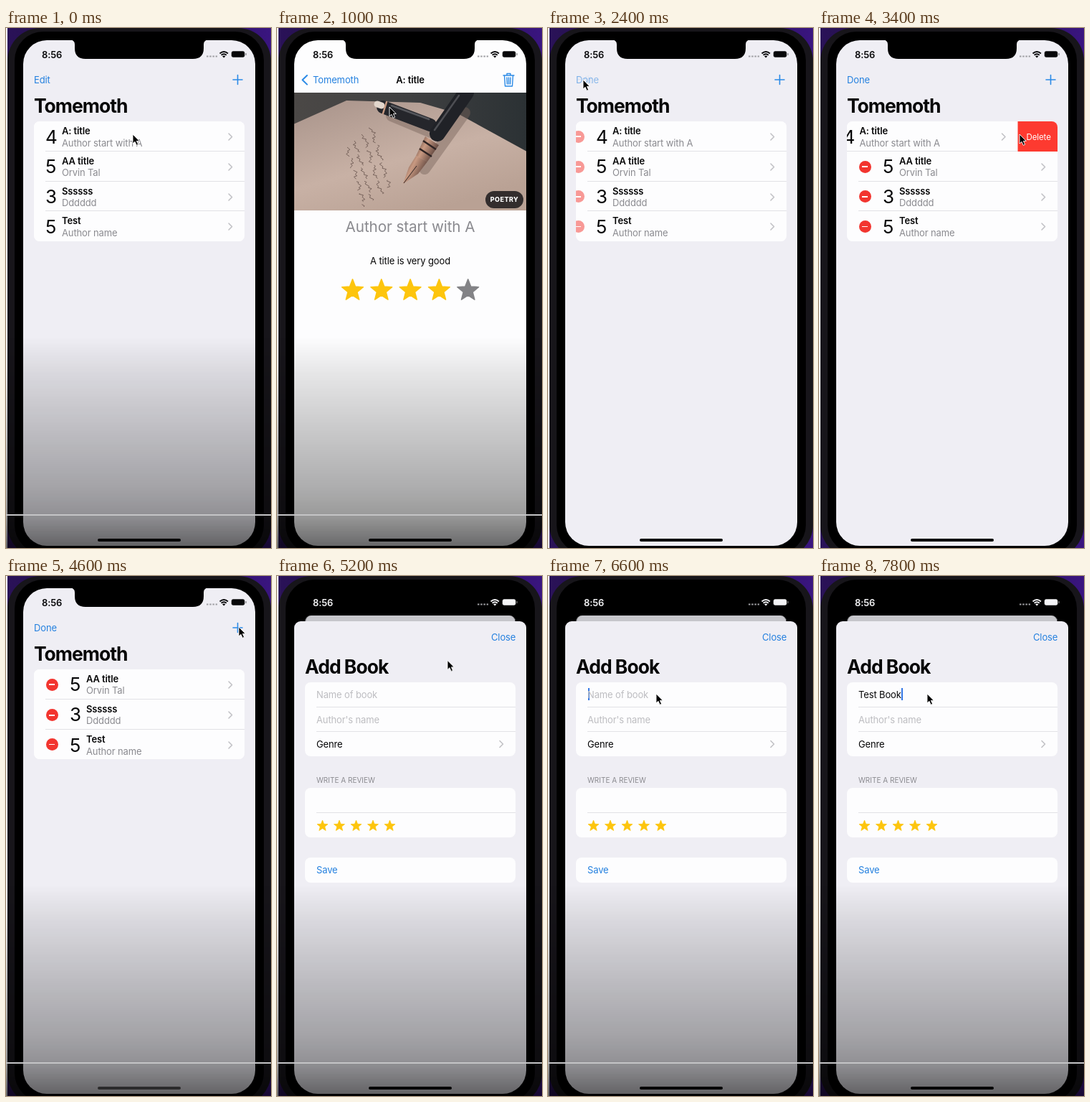
Animation of 370 by 724 pixels, one loop 8000 ms. Source, as an HTML page:

```html
<!DOCTYPE html>
<html lang="en">
<head>
<meta charset="utf-8">
<title>Reading list app</title>
<style>
* { box-sizing: border-box; animation: 8s linear var(--t, 0ms) infinite paused; }
html, body { margin: 0; width: 100%; height: 100%; overflow: hidden; background: #fff; }
body { font: 13px/20px Inter, Roboto, sans-serif; letter-spacing: -.13px; color: #060607; }
div, svg { position: absolute; }
svg { left: 0; top: 0; width: 370px; height: 724px; overflow: visible; fill: none; }
#stage { left: 0; top: 0; width: 370px; height: 724px; overflow: hidden; }
.wall { left: 1.5px; right: 0; top: 0; bottom: 0; background: linear-gradient(90deg, #2a1258, #1c0e3c 50%, #3a1580); }
.frame { left: 1.5px; right: 0; top: 0; height: 738px; border-radius: 46px; background: #17151a; }
.bezel { left: 12px; right: 10px; top: 5px; height: 727px; border-radius: 40px; background: #000; }
.screen { left: 24px; top: 17px; width: 324px; height: 704px; border-radius: 33px; overflow: hidden; background: #000; }

/* Views fill the screen; .in restores stage coordinates inside them. */
.view { --top: 0px; left: 0; top: var(--top); width: 324px; height: 704px; overflow: hidden; background: #efeef4; }
.in { left: -24px; top: calc(-17px - var(--top)); width: 370px; height: 724px; }
.t { left: calc(var(--x) * 1px); top: calc(var(--y) * 1px - 10px); white-space: nowrap; }
.mid { transform: translateX(-50%); }
.blue { color: #2480df; }
.grey { color: #8a8a8f; }
.hint { color: #bdbdc1; }
.semi { font-weight: 600; }
.big { font-size: 26.5px; font-weight: 700; letter-spacing: -1px; }
.line { stroke: #2b8ae6; stroke-width: 1.6; stroke-linecap: round; stroke-linejoin: round; }
.chev { stroke: #c2c2c6; stroke-width: 1.6; stroke-linecap: round; stroke-linejoin: round; }

.card { left: 39px; width: 294px; border-radius: 8px; overflow: hidden; background: #fdfdfe; }
.card hr { position: absolute; left: 16px; right: 0; height: 1px; margin: 0; border: 0; background: #e2e2e6; }
.row { position: relative; height: 41.75px; overflow: hidden; }
.face { left: 0; top: 0; width: 294px; height: 41.75px; background: #fdfdfe; }
.face hr { bottom: 0; }
.row:last-child hr { display: none; }
.body { left: 0; top: 0; animation-name: shift; }
.num { font-size: 26px; letter-spacing: 0; }
.minus { left: -17.5px; top: 12.8px; width: 17px; height: 17px; border-radius: 50%; background: #f2352f; animation-name: reveal; }
.minus::after { content: ""; position: absolute; left: 4.2px; top: 7.7px; width: 8.6px; height: 1.6px; background: #fff; }
.delete { left: 294px; top: 0; width: 294px; height: 41.75px; background: #fd3a30; color: #fff; font-size: 11.5px; letter-spacing: -.1px; }
.row:first-child { animation-name: collapse; }
.row:first-child .face { animation-name: swipe; }

#home { transform-origin: 162px 0; animation-name: behind; }
#list { animation-name: part; }
#detail { background: #fdfdfe; animation-name: push; }
#sheet { --top: 46px; border-radius: 9px 9px 0 0; animation-name: rise; }
#edit { animation-name: conceal; }
#done { animation-name: reveal; }
#status { animation-name: invert; }
#veil { left: 0; top: 0; width: 370px; height: 724px; animation-name: veil;
  background: linear-gradient(#0000 430px, #00000017 480px, #00000034 560px, #00000050 640px, #00000063 677px, #00000098); }
#veil div { left: 0; top: 677px; width: 370px; height: 2px; background: #c4c4c6; }
#bar { left: 128px; top: 711px; width: 116px; height: 4px; border-radius: 2px; background: #000; animation-name: dim; }
#pointer { left: 0; top: 0; animation-name: point; }
#caret { display: inline-block; position: relative; top: 3px; width: 2px; height: 17px; margin: -3px 0 0 .5px; background: #3478e6; }
.badge { left: 291px; top: 227px; width: 53px; height: 23.5px; border-radius: 12px; background: #1f1c1ddd; color: #fff;
  font-size: 9px; font-weight: 800; letter-spacing: .45px; line-height: 23.5px; text-align: center; }

@keyframes push {
  0%, 3.75% { transform: translateX(326px); } 5% { transform: translateX(240px); }
  7.5% { transform: translateX(45px); } 10%, 20% { transform: none; }
  22.5% { transform: translateX(260px); } 25%, 100% { transform: translateX(326px); }
}
@keyframes part {
  0%, 3.75% { transform: none; } 5% { transform: translateX(-26px); }
  7.5% { transform: translateX(-84px); } 10%, 20% { transform: translateX(-97px); }
  22.5% { transform: translateX(-20px); } 25%, 100% { transform: none; }
}
@keyframes shift {
  0%, 27.5% { transform: none; } 30% { transform: translateX(12px); }
  32.5% { transform: translateX(31px); } 35%, 100% { transform: translateX(34px); }
}
@keyframes reveal { 0%, 27.5% { opacity: 0; } 30% { opacity: .5; } 32.5%, 100% { opacity: 1; } }
@keyframes conceal { 0%, 27.5% { opacity: 1; } 30% { opacity: .12; } 32.5%, 100% { opacity: 0; } }
@keyframes swipe {
  0%, 36.25% { transform: none; } 37.5% { transform: translateX(-24px); }
  40%, 45% { transform: translateX(-55.5px); } 50%, 100% { transform: translateX(-294px); }
}
@keyframes collapse { 0%, 45% { height: 41.75px; } 47.5% { height: 18px; } 50%, 100% { height: 0; } }
@keyframes rise {
  0%, 58.75% { transform: translateY(670px); } 60% { transform: translateY(420px); }
  62.5% { transform: translateY(45px); } 65%, 100% { transform: none; }
}
@keyframes behind {
  0%, 58.75% { transform: none; border-radius: 0; filter: none; }
  65%, 100% { transform: translateY(38px) scale(.905); border-radius: 9px; filter: brightness(.83); }
}
@keyframes invert { 0%, 60% { color: #08080a; } 62.5%, 100% { color: #f4f4f6; } }
@keyframes veil { 0%, 22.5% { opacity: 1; } 27.5%, 52.5% { opacity: 0; } 55%, 100% { opacity: 1; } }
@keyframes dim { 0%, 55% { opacity: 1; } 57.5% { opacity: .6; } 60%, 100% { opacity: 1; } }
@keyframes point {
  0%, 5% { transform: translate(177px, 148px); } 12.5% { transform: translate(157px, 110px); }
  17.5%, 20% { transform: translate(55px, 74px); } 26%, 30% { transform: translate(49px, 72px); }
  35%, 37.5% { transform: translate(64px, 150px); } 42.5%, 46% { transform: translate(280px, 148px); }
  56%, 60% { transform: translate(325px, 71px); } 70%, 100% { transform: translate(151px, 164px); }
}
</style>
</head>
<body>
<div id="stage">
  <div class="wall"></div><div class="frame"></div><div class="bezel"></div>
  <div class="screen">
    <div class="view" id="home">
      <div class="view" id="list"><div class="in">
        <div class="t blue" id="edit" style="--x:39;--y:72">Edit</div>
        <div class="t blue" id="done" style="--x:39;--y:72">Done</div>
        <svg><path class="line" d="M317 72h13M323.5 65.5v13"/></svg>
        <div class="t big" style="--x:39;--y:108">Tomemoth</div>
        <div class="card" id="books" style="top:130px"></div>
      </div></div>
      <div class="view" id="detail"><div class="in">
        <svg>
          <defs>
            <linearGradient id="desk"><stop stop-color="#4b4846"/><stop offset=".5" stop-color="#3f4041"/><stop offset="1" stop-color="#2b3134"/></linearGradient>
            <linearGradient id="paper" x2=".6" y2="1"><stop stop-color="#a8938a"/><stop offset=".6" stop-color="#c8b1a5"/><stop offset="1" stop-color="#b9a194"/></linearGradient>
            <linearGradient id="copper" x2="1" y2=".6"><stop stop-color="#3a2b28"/><stop offset=".45" stop-color="#c99a82"/><stop offset="1" stop-color="#4a3531"/></linearGradient>
            <clipPath id="crop"><path d="M23 90h326v164H23z"/></clipPath>
          </defs>
          <g clip-path="url(#crop)">
            <path fill="url(#desk)" d="M23 90h326v164H23z"/>
            <path fill="url(#paper)" d="M23 134L97 101 200 104 252 119 349 172V254H23z"/>
            <g id="script" stroke="#5d4a44" stroke-width="1" opacity=".75"></g>
            <g stroke-linecap="round">
              <path stroke="#766259" stroke-width="16" opacity=".45" d="M160 122L215 145M262 118L206 196"/>
              <path stroke="#25262b" stroke-width="18" d="M148 110L214 135"/>
              <path stroke="#55565b" stroke-width="2.5" d="M160 108L212 127"/>
              <path stroke="#e2d6cc" stroke-width="9" d="M140 106L146 108"/>
              <path stroke="#c79a82" stroke-width="2.5" d="M153 103L148 119"/>
              <path stroke="#202227" stroke-width="22" d="M264 90L224 147"/>
              <path stroke="#4d4e53" stroke-width="2.5" d="M254 94L220 142"/>
            </g>
            <path fill="url(#copper)" d="M207 151L226 163 210 186 194 178z"/>
            <path stroke="#2f2423" stroke-width="2.5" d="M204 157L222 169M199 168L216 179"/>
            <path fill="url(#copper)" d="M194 178L210 186 197 203 176 217 184 194z"/>
            <path stroke="#2f2423" d="M177 216L195 192"/>
          </g>
          <path class="line" style="stroke-width:2" d="M42 66l-6.5 6.3 6.5 6.3"/>
          <path class="line" style="stroke-width:1.4" d="M316 66h15M321 66v-2.5h5V66M317.5 66l1 15h10l1-15M321 69l.4 9M323.5 69v9M326 69l-.4 9"/>
        </svg>
        <div class="t blue" style="--x:50;--y:72">Tomemoth</div>
        <div class="t mid semi" style="--x:186;--y:72">A: title</div>
        <div class="badge">POETRY</div>
        <div class="t mid grey" style="--x:186;--y:277;font-size:20.7px;letter-spacing:-.1px">Author start with A</div>
        <div class="t mid" style="--x:186;--y:324">A title is very good</div>
        <svg id="rating"></svg>
      </div></div>
    </div>
    <div class="view" id="sheet"><div class="in">
      <div class="t blue" style="--x:299;--y:85">Close</div>
      <div class="t big" style="--x:39;--y:125.5">Add Book</div>
      <div class="card" style="top:148px;height:103px"><hr style="top:33.5px"><hr style="top:68px"></div>
      <div class="t" style="--x:55;--y:165"><span id="name"></span><span id="caret"></span></div>
      <div class="t hint" id="placeholder" style="--x:55;--y:165">Name of book</div>
      <div class="t hint" style="--x:55;--y:199.5">Author's name</div>
      <div class="t" style="--x:55;--y:234">Genre</div>
      <div class="t grey" style="--x:55;--y:284;font-size:10px;letter-spacing:0">WRITE A REVIEW</div>
      <div class="card" style="top:295px;height:69px"><hr style="top:34px"></div>
      <div class="card" style="top:392px;height:34.5px"></div>
      <div class="t blue" style="--x:55;--y:409">Save</div>
      <svg id="score"><path class="chev" d="M311 229.5l4.5 4.5-4.5 4.5"/></svg>
    </div></div>
  </div>
  <svg><path fill="#000" d="M90 16.5Q96 17 96 23V28Q96 43 111 43H261Q276 43 276 28V23Q276 17 282 16.5z"/></svg>
  <div id="status">
    <div class="t semi" style="--x:50;--y:36.5">8:56</div>
    <svg stroke="currentColor">
      <path stroke="#a0a0a4" stroke-width="2" stroke-dasharray="2.5 1.7" d="M280 39.5h15"/>
      <path stroke-width="1.9" d="M298.5 35.5q5.7-5 11.4 0M300.6 37.8q3.6-3 7.2 0"/>
      <path fill="currentColor" stroke="none" d="M302 39.3q2.2-1.6 4.4 0l-2.2 2.2z"/>
      <rect x="315" y="32.5" width="18" height="8" rx="2.2" fill="currentColor" stroke-opacity=".5"/>
      <path stroke-opacity=".6" d="M335 35v3"/>
    </svg>
  </div>
  <div id="bar"></div>
  <div id="veil"><div></div></div>
  <svg id="pointer"><path fill="#000" stroke="#fff" stroke-width=".9" d="M0 0V13L3 10.3 5.2 15.3 7.6 14.2 5.4 9.4H9.3z"/></svg>
</div>
<script>
const $ = id => document.getElementById(id);
const add = (id, html) => $(id).insertAdjacentHTML('beforeend', html);

const books = [
  [4, 'A: title', 'Author start with A'],
  [5, 'AA title', 'Orvin Tal'],
  [3, 'Ssssss', 'Dddddd'],
  [5, 'Test', 'Author name']
];
books.forEach(([stars, title, author], i) => add('books', `
  <div class="row"><div class="face">
    <div class="body">
      <div class="minus"></div>
      <div class="t num" style="--x:16;--y:21.5">${stars}</div>
      <div class="t semi" style="--x:39;--y:13">${title}</div>
      <div class="t grey" style="--x:39;--y:29.5">${author}</div>
    </div>
    <svg style="width:294px;height:41px"><path class="chev" d="M272 17l4.5 4.5-4.5 4.5"/></svg>
    <hr>
    ${i ? '' : '<div class="delete"><div class="t" style="--x:12;--y:21.5">Delete</div></div>'}
  </div></div>`));

function star(cx, cy, r, color) {
  const points = Array.from({ length: 10 }, (_, i) => {
    const a = i * Math.PI / 5, d = i % 2 ? r * .43 : r;
    return `${(cx + d * Math.sin(a)).toFixed(2)},${(cy - d * Math.cos(a)).toFixed(2)}`;
  });
  return `<polygon points="${points.join(' ')}" fill="${color}" stroke="${color}" stroke-linejoin="round" stroke-width="${r / 10}"/>`;
}
for (let i = 0; i < 5; i++) {
  add('rating', star(105.5 + i * 40.3, 365.5, 15.6, i < 4 ? '#fdc50d' : '#838386'));
  add('score', star(63.5 + i * 23.5, 348, 7.9, '#fdc50d'));
}

// Slanted handwriting on the sheet of paper
for (let i = 0; i < 4; i++) {
  let d = `M${98 + i * 10} ${166 - i * 9}`;
  for (let k = 0; k < 36; k++) {
    const swing = 2.5 + 1.8 * Math.sin(k * 2.3 + i * 5);
    d += `l${(k % 2 ? -swing : swing + 1.4).toFixed(1)} ${(2.3 + Math.cos(k * 1.7)).toFixed(1)}`;
  }
  add('script', `<path d="${d}" stroke-dasharray="${22 + i * 5} 6"/>`);
}

const STEP = 200, LOOP = 8000, start = performance.now();
function render() {
  const t = Math.floor((performance.now() - start) % LOOP / STEP) * STEP;
  document.documentElement.style.setProperty('--t', -t + 'ms');
  const typed = t < 7200 ? 0 : 1 + Math.round((t - 7200) / 75);
  $('name').textContent = 'Test Book'.slice(0, typed);
  $('placeholder').style.visibility = typed ? 'hidden' : '';
  $('caret').style.visibility = t < 6400 ? 'hidden' : '';
  requestAnimationFrame(render);
}
render();
</script>
</body>
</html>
```
